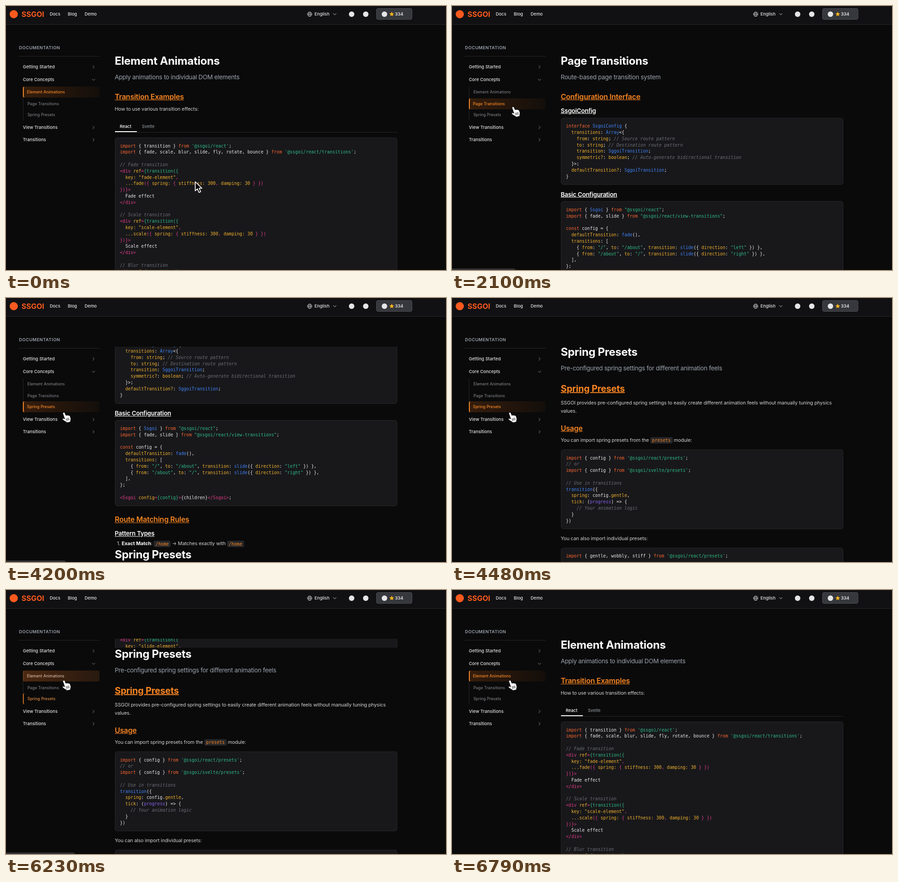
An HTML page for the animation above (7560 ms loop, 965 px wide and 580 px high).

```html
<!DOCTYPE html>
<html lang="en">
<head>
<meta charset="utf-8">
<title>Element Animations</title>
<style>
  html, body { margin: 0; width: 100%; height: 100%; overflow: hidden; background: #0a0a0a; }
  #stage {
    position: relative; width: 965px; height: 580px; overflow: hidden; background: #0a0a0a;
    color: #e5e5e7; font-family: Inter, "Noto Sans", sans-serif; -webkit-font-smoothing: antialiased;
  }
  #stage div, #stage svg, .t { position: absolute; }
  .t { line-height: 30px; margin-top: -15px; white-space: pre; }

  #header { left: 0; top: 0; width: 965px; height: 40px; background: #111113; border-bottom: 1px solid #27272a; }
  .brand { font-size: 16px; font-weight: 700; color: #fb5a1e; }
  .link { font-size: 9.5px; font-weight: 500; }
  .dot { width: 12px; height: 12px; border-radius: 50%; background: #e5e5e7; }
  .logo { width: 18px; height: 18px; background: #fb5a1e; }
  #stars { left: 812px; top: 5px; width: 77px; height: 23px; background: #37383d; border: 1px solid #4d4e55; border-radius: 4px; }

  .label { font-size: 9.4px; font-weight: 600; letter-spacing: .5px; color: #9ca3af; }
  .group { font-size: 9.55px; font-weight: 500; letter-spacing: .04px; }
  .rule { height: 1px; background: #27272a; }
  .item {
    left: 37px; width: 166px; height: 24px; border-left: 2px solid; border-radius: 4px;
    font-size: 8.6px; line-height: 24px; letter-spacing: .1px;
  }
  .item span { position: absolute; left: 7px; white-space: pre; }

  #view { left: 0; top: 107px; width: 965px; height: 473px; overflow: hidden; }
  .page { left: 0; top: 0; width: 965px; height: 604px; overflow: hidden; }
  .page > div { left: 0; top: -107px; }
  .h1 { font-size: 24.1px; font-weight: 700; letter-spacing: -.3px; color: #fff; }
  .sub { font-size: 13.4px; letter-spacing: -.29px; color: #9ca3af; }
  .h2, .h2b { font-size: 16px; font-weight: 600; letter-spacing: -.24px; color: #f98622; text-decoration: underline; }
  .h2b { font-size: 20px; font-weight: 700; letter-spacing: -.2px; }
  .h3 { font-size: 13.4px; font-weight: 600; letter-spacing: -.21px; color: #fff; text-decoration: underline; }
  .body { font-size: 10.7px; letter-spacing: -.1px; color: #d4d4d8; }
  .body b { font-weight: 700; letter-spacing: 0; color: #fff; }
  .tab { font-size: 9.4px; font-weight: 500; }
  code, pre { font-family: "DejaVu Sans Mono", "Noto Sans Mono", monospace; font-size: 9.69px; letter-spacing: 0; }
  code { padding: 1.5px 4px; border-radius: 3px; background: #27272a; color: #f98622; }
  .box {
    left: 238.5px; width: 619px; box-sizing: border-box; overflow: hidden;
    background: #18181b; border: 1px solid #29292d; border-radius: 5px;
  }
  pre { position: absolute; left: 10.5px; top: 10.7px; margin: 0; line-height: 13.79px; color: #e8e8ea; }
  .k { color: #f9652f; } .s { color: #2fb984; } .c { color: #6b6e75; font-style: italic; }
  .p { color: #e03c88; } .a { color: #efb02e; } .b { color: #3f83f5; } .v { color: #8660e8; }

  #status { left: -2px; top: 576.5px; height: 10px; background: #2b2b2e; border: 1px solid #48484c; border-radius: 0 5px 0 0; box-sizing: border-box; }
</style>
</head>
<body>
<div id="stage">
  <div id="header"></div>
  <div id="side"></div>
  <div id="view"></div>
  <div id="status"></div>
  <svg id="arrow" width="20" height="28" viewBox="-2 -2 20 28">
    <path d="M0 0V20L4.8 15.7L8.2 23.6L12 22L8.6 14.3H14.6Z" fill="#000" stroke="#fff" stroke-width="1.7" stroke-linejoin="round"/>
  </svg>
  <svg id="hand" width="22" height="25.3" viewBox="0 0 20 23">
    <path d="M4.2 1c1.2-.4 2 .3 2.5 1.4l2 4.6c.6-1 2.2-1.2 2.9-.2.8-.8 2.2-.7 2.7.4 1-.5 2.1 0 2.5 1l1.2 3.6c.6 2 .3 3.8-.4 5.4l.3 2.3-7.6 2-.9-1.7c-2.2-.6-4.8-2.6-7-4.4-1.3-1-.4-2.9 1.2-2.6l2.5.8L2.6 3.6C2.1 2.4 2.8 1.4 4.2 1z" fill="#fff" stroke="#000" stroke-width=".9"/>
    <path d="M8.9 13.2l1.4 4.2M11.3 12.5l1.4 4.2M13.7 11.8l1.4 4.2" stroke="#000" stroke-width=".9" stroke-linecap="round"/>
  </svg>
</div>
<script>
const $ = id => document.getElementById(id);

// ---- building helpers ----
function add(parent, cls, style, html = '', tag = 'div') {
  const el = document.createElement(tag);
  el.className = cls;
  el.style.cssText = style;
  el.innerHTML = html;
  return parent.appendChild(el);
}
const text = (parent, x, y, cls, html) => add(parent, 't ' + cls, `left:${x}px;top:${y}px`, html, 'span');
const rect = (parent, cls, x, y, w, more = '') => add(parent, cls, `left:${x}px;top:${y}px;width:${w}px;${more}`);
const icon = (parent, x, y, shape, paint = 'fill="none" stroke="#d4d4d8"') =>
  add(parent, '', `left:${x - 8}px;top:${y - 8}px`, `<svg width="16" height="16" viewBox="-8 -8 16 16" ${paint}>${shape}</svg>`);
const chevron = (parent, x, y, turn, paint) =>
  icon(parent, x, y, `<path d="M-1.5-3L1.5 0L-1.5 3" transform="rotate(${turn})" stroke-linecap="round"/>`, paint);

// Coloured code: «x...» wraps a run in colour class x.
const paintCode = src => src.replace(/&/g, '&amp;').replace(/</g, '&lt;')
  .replace(/«(.)([^»]*)»/g, '<span class="$1">$2</span>');
const codeBox = (parent, y, h, src) =>
  add(parent, 'box', `top:${y}px;height:${h}px`, `<pre>${paintCode(src)}</pre>`);

// ---- header ----
const header = $('header');
rect(header, 'dot logo', 8, 9, 18);
text(header, 34, 18, 'brand', 'SSGOI');
[['Docs', 96], ['Blog', 135.5], ['Demo', 172.5], ['English', 676.5]].forEach(([s, x]) => text(header, x, 18, 'link', s));
icon(header, 666, 18, '<circle r="4.8"/><ellipse rx="2" ry="4.8"/><path d="M-4.8 0H4.8"/>');
chevron(header, 721, 18, 90);
rect(header, 'dot', 752, 12, 12);
rect(header, 'dot', 783, 12, 12);
add(header, '', '').id = 'stars';
rect(header, 'dot', 823.5, 12, 12);
const star = Array.from({ length: 10 }, (_, i) => {
  const r = i % 2 ? 2.5 : 5.4, a = i * Math.PI / 5;
  return [r * Math.sin(a), -r * Math.cos(a)].map(v => v.toFixed(2));
}).join(' ');
icon(header, 845.5, 18.3, `<polygon points="${star}"/>`, 'fill="#fbb51c"');
text(header, 853, 18, 'link', '<b style="font-weight:600">334</b>');

// ---- sidebar ----
const side = $('side');
text(side, 28.5, 92, 'label', 'DOCUMENTATION');
rect(side, 'rule', 28, 110, 177);
[['Getting Started', 134], ['Core Concepts', 161.5, 90], ['View Transitions', 266.5], ['Transitions', 294]].forEach(([s, y, turn = 0]) => {
  text(side, 37, y, 'group', s);
  chevron(side, 191.5, y, turn, 'fill="none" stroke="#8b8f97"');
});
rect(side, 'rule', 37, 177, 1, 'height:75px');
const items = ['Element Animations', 'Page Transitions', 'Spring Presets']
  .map((s, i) => add(side, 'item', `top:${177 + 25 * i + (i === 1 ? .5 : 0)}px`, `<span>${s}</span>`));

// ---- pages ----
const pages = [0, 1, 2].map(() => add($('view'), 'page', '', '<div></div>'));
const [elements, routes, presets] = pages.map(p => p.firstChild);
const intro = (page, title, sub) => {
  text(page, 238.5, 121.3, 'h1', title);
  text(page, 238.5, 155.5, 'sub', sub);
};
const line = (page, y, cls, html) => text(page, 238.5, y, cls, html);

const demo = (name, extra = '') => {
  const cap = name[0].toUpperCase() + name.slice(1);
  return `«c// ${cap} transition»
«p<div» «aref»«p=»«s{transition({»
  «akey:» «a"${name}-element"»«p,»
  «a...${name}»«p({» ${extra}«aspring:» «p{» «astiffness: 300»«p,» «adamping: 30» «p} })»
«p})}>»
  ${cap} effect
«p</div>»

`;
};

intro(elements, 'Element Animations', 'Apply animations to individual DOM elements');
line(elements, 198.7, 'h2', 'Transition Examples');
line(elements, 227, 'body', 'How to use various transition effects:');
text(elements, 249.5, 264.7, 'tab', 'React').style.color = '#fff';
text(elements, 298, 264.7, 'tab', 'Svelte').style.color = '#8b8f97';
rect(elements, 'rule', 238.5, 276.5, 619.5);
rect(elements, 'rule', 238.5, 275.3, 48.5, 'height:1.7px;background:#fff');
codeBox(elements, 289, 700, `«kimport» { transition } «kfrom» «s'@ssgoi/react'»;
«kimport» { fade, scale, blur, slide, fly, rotate, bounce } «kfrom» «s'@ssgoi/react/transitions'»;

` + demo('fade') + demo('scale') + demo('blur', '«aamount: 10»«p,» ') + demo('slide'));

intro(routes, 'Page Transitions', 'Route-based page transition system');
line(routes, 198.7, 'h2', 'Configuration Interface');
line(routes, 230, 'h3', 'SsgoiConfig');
codeBox(routes, 245.5, 147, `«kinterface» «bSsgoiConfig» {
  «atransitions»: «bArray»<{
    «afrom»: «astring»; «c// Source route pattern»
    «ato»: «astring»; «c// Destination route pattern»
    «atransition»: «bSggoiTransition»;
    «asymmetric?»: «aboolean»; «c// Auto-generate bidirectional transition»
  }>;
  «adefaultTransition?»: «bSggoiTransition»;
}`);
line(routes, 413.7, 'h3', 'Basic Configuration');
const route = (from, to, dir) =>
  `    { «afrom»: «s"${from}"», «ato»: «s"${to}"», «atransition»: «bslide»({ «adirection»: «s"${dir}"» }) },\n`;
codeBox(routes, 429.3, 189, `«kimport» { «bSsgoi» } «kfrom» «s"@ssgoi/react"»;
«kimport» { fade, slide } «kfrom» «s"@ssgoi/react/view-transitions"»;

«kconst» config = {
  «adefaultTransition»: «bfade»(),
  «atransitions»: [
${route('/', '/about', 'left')}${route('/about', '/', 'right')}  ],
};

«p<Ssgoi» «aconfig»«p=»«s{config}»«p>»{children}«p</Ssgoi>»;`);
line(routes, 646.5, 'h2', 'Route Matching Rules');
line(routes, 678, 'h3', 'Pattern Types');
text(routes, 243.5, 701.3, 'body', '1. <b>Exact Match</b>: <code>/home</code> → Matches exactly with <code>/home</code>');

intro(presets, 'Spring Presets', 'Pre-configured spring settings for different animation feels');
line(presets, 200.5, 'h2b', 'Spring Presets');
line(presets, 232.5, 'body', 'SSGOI provides pre-configured spring settings to easily create different animation feels without manually tuning physics');
line(presets, 250.5, 'body', 'values.');
line(presets, 287.5, 'h2', 'Usage');
line(presets, 315.3, 'body', 'You can import spring presets from the <code>presets</code> module:');
codeBox(presets, 335, 175, `«kimport» { config } «kfrom» «s'@ssgoi/react/presets'»;
«c// or»
«kimport» { config } «kfrom» «s'@ssgoi/svelte/presets'»;

«c// Use in transitions»
«btransition»({
  «aspring»: config.«agentle»,
  «atick»: («vprogress») => {
    «c// Your animation logic»
  }
})`);
line(presets, 531, 'body', 'You can also import individual presets:');
codeBox(presets, 550.5, 200, `«kimport» { gentle, wobbly, stiff } «kfrom» «s'@ssgoi/react/presets'»;`);

// ---- timeline ----
const LOOP = 7560, STEP = 70, SHIFT = 604;
// Each visit: link highlight start, page slide start, page, link hint start and width
const visits = [
  { nav: -1e4, slide: -1e4, page: 0, hint: -1e4, width: 0 },
  { nav: 1755, slide: 1795, page: 1, hint: 1260, width: 142 },
  { nav: 4055, slide: 4144.5, page: 2, hint: 3500, width: 134 },
  { nav: 6212, slide: 6214, page: 0, hint: 5810, width: 154 },
];
const path = [
  [0, 415, 386], [770, 138, 226], [910, 136, 222], [2750, 136, 222], [2800, 136.5, 214],
  [2950, 136.5, 214], [3220, 129, 252], [4850, 129, 252], [5180, 129, 206], [5390, 129, 199], [LOOP, 129, 199],
];

const clamp = v => Math.min(1, Math.max(0, v));
const ease = u => u * u * (3 - 2 * u);
const mix = (a, b, p) => `rgb(${a.map((v, i) => v + (b[i] - v) * p)})`;
const GREY = [139, 143, 150], WHITE = [229, 229, 231], ORANGE = [249, 138, 40];

// Damped spring: stiffness 300, damping 30
function spring(ms) {
  const t = Math.max(0, ms) / 1000, w = Math.sqrt(75);
  return t > .62 ? 1 : 1 - Math.exp(-15 * t) * (Math.cos(w * t) + 15 / w * Math.sin(w * t));
}

function latest(t, key) {
  let i = visits.length - 1;
  while (visits[i][key] > t) i--;
  return i;
}

function pointer(t) {
  let i = 0;
  while (i < path.length - 2 && path[i + 1][0] <= t) i++;
  const [t0, x0, y0] = path[i], [t1, x1, y1] = path[i + 1];
  const u = ease(clamp((t - t0) / (t1 - t0)));
  return [x0 + (x1 - x0) * u, y0 + (y1 - y0) * u];
}

function drawPages(t) {
  const i = latest(t, 'slide'), now = visits[i].page;
  const before = i ? visits[i - 1].page : now;
  const x = i ? spring(t - visits[i].slide) : 1;
  const dir = now > before ? 1 : -1;
  pages.forEach((p, n) => {
    const shown = n === now || (n === before && x !== 1);
    p.style.visibility = shown ? 'visible' : 'hidden';
    p.style.transform = `translateY(${dir * SHIFT * (n === now ? 1 - x : -x)}px)`;
  });
}

function drawItems(t, hover) {
  const i = latest(t, 'nav'), now = visits[i].page;
  const before = i ? visits[i - 1].page : -1;
  const p = 1 - (1 - clamp((t - visits[i].nav) / 150)) ** 2;
  items.forEach((el, n) => {
    const on = n === now ? p : n === before ? 1 - p : 0;
    const idle = n === hover ? WHITE : GREY;
    el.style.color = mix(idle, ORANGE, on);
    el.style.fontWeight = on > .5 ? 500 : 400;
    el.style.borderLeftColor = `rgba(249,138,40,${on})`;
    el.firstChild.style.left = (n === now || n === hover ? 7 : 8) + 'px';
    el.style.background = n === now
      ? `linear-gradient(90deg, rgba(249,115,22,.18), rgba(249,115,22,${.04 * p})), rgba(249,140,60,${.15 * (1 - p)})`
      : n === hover ? '#141417' : 'none';
  });
}

function drawHint(t) {
  const i = latest(t, 'hint'), v = visits[i];
  $('status').style.visibility = i && t < v.slide + 330 ? 'visible' : 'hidden';
  $('status').style.width = v.width + 'px';
}

function draw(t) {
  const [x, y] = pointer(t), onLink = x < 205;
  const row = Math.floor((y - 177) / 25);
  drawPages(t);
  drawItems(t, onLink && row < 4 ? Math.min(2, row) : -1);
  drawHint(t);
  $('arrow').style.visibility = onLink ? 'hidden' : 'visible';
  $('hand').style.visibility = onLink ? 'visible' : 'hidden';
  $('arrow').style.transform = `translate(${x - 2}px,${y - 2}px)`;
  $('hand').style.transform = `translate(${x - 7}px,${y - 1.5}px)`;
}
['arrow', 'hand'].forEach(id => { $(id).style.left = $(id).style.top = 0; });

const start = performance.now();
function tick() {
  const t = (performance.now() - start) % LOOP;
  draw(Math.floor(t / STEP) * STEP);
  requestAnimationFrame(tick);
}
tick();
</script>
</body>
</html>
```
